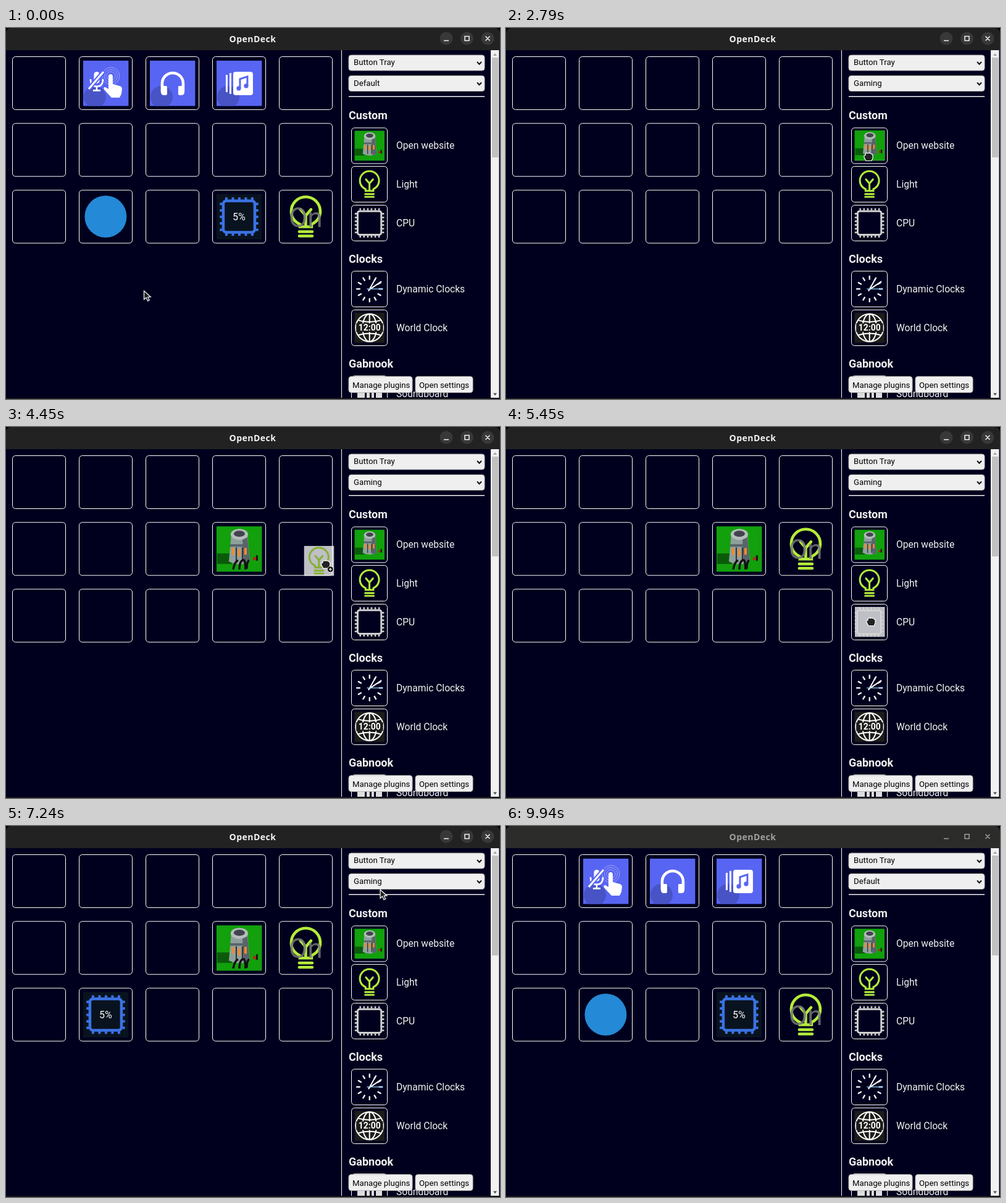
An HTML page for the animation above (10000 ms loop, 800x602 px).

```html
<!DOCTYPE html>
<html lang="en">
<meta charset="utf-8">
<title>OpenDeck</title>
<style>
  html, body { margin: 0; width: 100%; height: 100%; overflow: hidden; background: #000; }
  svg { display: block; width: 100%; height: 100%; font-family: Roboto, sans-serif; }
  .line { fill: none; stroke: #fff; stroke-width: 1; }
  .label { font-size: 15.6px; fill: #f2f2f2; }
  .head { font-size: 18px; font-weight: 600; fill: #f2f2f2; }
  .form { font-size: 13.2px; }
  .title { font: bold 14px "Open Sans", sans-serif; letter-spacing: .5px; text-anchor: middle; }
</style>
<svg viewBox="0 0 800 602">
  <defs>
    <clipPath id="tile"><path d="M0 0H73.5V73.5H0Z"/></clipPath>
    <clipPath id="view"><path d="M544 36H785V600H544Z"/></clipPath>
    <g id="blue" clip-path="url(#tile)">
      <path fill="#5865f2" d="M0 0H74V74H0Z"/>
      <circle cx="19" cy="59" r="18" fill="#4854c6"/>
    </g>
    <g id="mute">
      <use href="#blue"/>
      <g fill="none" stroke="#fff" stroke-width="1" opacity=".4">
        <circle cx="45" cy="25" r="14"/><circle cx="45" cy="25" r="10.5"/><circle cx="45" cy="25" r="7"/>
      </g>
      <rect x="17.5" y="18" width="9" height="19" rx="4.5" fill="#fff"/>
      <path fill="none" stroke="#fff" stroke-width="2.6" d="M12 30q0 12 10 12t10-12M22 42v6M16 48.5h12"/>
      <path stroke="#5865f2" stroke-width="7" d="M34 17 9 46"/>
      <path stroke="#fff" stroke-width="3" d="M33 18 9 46"/>
      <path fill="#fff" d="M41 26q0-4 3.5-4t3.5 4v12l11 3q4 1 4 5l-1 8-3 6h-13L34 47q-2-4 2-4l5 3z"/>
    </g>
    <g id="phones">
      <use href="#blue"/>
      <path fill="none" stroke="#fff" stroke-width="4.5" d="M20 50V37a17 17 0 0 1 34 0V50"/>
      <path fill="#fff" d="M18 41h8q2 0 2 2v11q0 2-2 2h-3q-5 0-5-5zM56 41h-8q-2 0-2 2v11q0 2 2 2h3q5 0 5-5z"/>
    </g>
    <g id="album">
      <use href="#blue"/>
      <path stroke="#fff" stroke-width="3" d="M16.5 23v28M22.5 20v34"/>
      <rect x="27" y="18" width="32" height="38" rx="4" fill="#fff"/>
      <path fill="none" stroke="#5865f2" stroke-width="3" d="M38 45V30l12-4v15"/>
      <g fill="#5865f2"><circle cx="36" cy="45" r="3.6"/><circle cx="48" cy="41" r="3.6"/></g>
    </g>
    <circle id="disc" cx="36.5" cy="36.5" r="34" fill="#2489d6"/>
    <g id="bulb" fill="none" stroke="#b4ec3a" stroke-width="4.6" stroke-linecap="round">
      <path d="M27 53v-4q-14-7-14-21a23.5 23.5 0 0 1 47 0q0 14-14 21v4zM36.5 51V35L28 25M36.5 35 45 25"/>
      <path d="M26 61h21M26 68h21"/>
    </g>
    <g id="on">
      <use href="#bulb"/>
      <text x="36.5" y="53" font-size="44" text-anchor="middle" fill="#777" fill-opacity=".85">On</text>
    </g>
    <g id="chip" fill="none" stroke="#cfcfcf">
      <rect x="7.5" y="7.5" width="58" height="58" rx="5" stroke-width="4.5"/>
      <path stroke-width="5" stroke-dasharray="4 5.2" d="M12 3H62M12 70H62M3 12V62M70 12V62"/>
    </g>
    <g id="load">
      <path fill="#09131f" d="M0 0H73.5V73.5H0Z"/>
      <g fill="none" stroke="#3b72e4">
        <rect x="11" y="11" width="51" height="51" rx="5" stroke-width="4.5"/>
        <path stroke-width="4.5" stroke-dasharray="4 6.5" d="M14 7.5H62M14 65.500H62M7.500 14V62M65.500 14V62"/>
      </g>
      <text x="36.500" y="42.500" font-size="16" text-anchor="middle" fill="#fff">5%</text>
    </g>
    <g id="tower">
      <path fill="#12a00c" d="M0 0H73.500V73.500H0Z"/>
      <path fill="#0a5a0a" d="M1 44H25V61H1Z"/>
      <path fill="#8fa09c" d="M24 12H50L54 57Q38 66 20 57Z"/>
      <path fill="#59636a" d="M42 18H50L54 57L44 61ZM22 29H51V33H22Z"/>
      <ellipse cx="37" cy="13" rx="14" ry="9" fill="#b6bcbc"/>
      <ellipse cx="37" cy="12" rx="9" ry="5" fill="#41434d"/>
      <path stroke="#f08a32" stroke-width="4" d="M27 35V46M37 37V49M47 35V46"/>
      <path stroke="#2b2f3a" stroke-width="2" d="M32 34V57M42 34V57"/>
      <path fill="#b02a18" d="M59 50h6v5h-6z"/><path fill="#151515" d="M64 47h3v9h-3z"/>
    </g>
    <g id="towerKey">
      <use href="#tower"/>
      <path fill="none" stroke="#111" stroke-width="3.500" d="M27 70q2-12 8-15M37 70q0-12 5-15t5 15M49 69q0-12 4-14"/>
    </g>
    <g id="clock" stroke="#fff"></g>
    <g id="globe">
      <path fill="#1c1d19" d="M0 0H73.500V73.500H0Z"/>
      <g fill="none" stroke="#fff" stroke-width="3">
        <circle cx="36.700" cy="36.700" r="34"/><ellipse cx="36.700" cy="36.700" rx="17" ry="34"/>
        <path d="M36.700 3V71M8 18Q36.700 27 65 18M8 55Q36.700 46 65 55"/>
      </g>
      <path fill="#1c1d19" d="M4 26H70V47H4Z"/>
      <text x="36.700" y="44" font-size="21" font-weight="bold" text-anchor="middle" fill="#fff">12:00</text>
    </g>
    <path id="chevron" d="M-3.500-2 0 1.800 3.500-2" fill="none" stroke="#111" stroke-width="2"/>
  </defs>

  <path fill="#00001e" d="M0 36H800V602H0Z"/>
  <path id="bar" d="M0 36V9Q0 0 9 0H791Q800 0 800 9V36Z"/>
  <g id="round" fill="#383838"><circle cx="713" cy="17" r="10.500"/><circle cx="746.500" cy="17" r="10.500"/><circle cx="780" cy="17" r="10.500"/></g>
  <g id="caption">
    <text class="title" x="399.500" y="23">OpenDeck</text>
    <path fill="none" stroke="currentColor" stroke-width="1.500" d="M709 20.500h8M743 13.500h7v7h-7zM776.500 13.500l7 7m0-7-7 7"/>
  </g>
  <path class="line" d="M543.500 36V600"/>
  <g id="keys"></g>
  <g id="home"></g>
  <g id="game"></g>

  <g id="side" clip-path="url(#view)"></g>
  <g fill="#efefef" stroke="#b5b5b5" stroke-width="1">
    <rect x="555" y="44" width="220" height="25" rx="4"/><rect x="555" y="77.500" width="220" height="25" rx="4"/>
    <rect x="555" y="565.500" width="103" height="26" rx="4"/><rect x="663" y="565.500" width="93" height="26" rx="4"/>
  </g>
  <path stroke="#f2f2f2" stroke-width="1.500" d="M555 111.200H775"/>
  <use href="#chevron" x="766.500" y="57"/><use href="#chevron" x="766.500" y="90.500"/>
  <g class="form">
    <text x="563" y="60">Button Tray</text><text id="profile" x="563" y="94"></text>
    <text x="561" y="583.500">Manage plugins</text><text x="669" y="583.500">Open settings</text>
  </g>

  <path fill="#f1f1f1" d="M785 36H798.500V600H785Z"/>
  <path fill="#c1c1c1" d="M787 48H797.500V210H787Z"/>
  <path fill="#a3a3a3" d="M789 45l3-4 3 4z"/><path fill="#505050" d="M789 592.500l3 4 3-4z"/>
  <path fill="#1b1b1b" d="M0 600.500H800V602H0Z"/>

  <g id="popup" class="form">
    <rect x="555.500" y="100.500" width="220.500" height="53" fill="#efefef" stroke="#8a8a8a"/>
    <rect id="mark" x="557" width="218" height="16.300" fill="#1e90ff"/>
  </g>
  <g id="ghost" opacity=".75"><path fill="#fff" d="M0 0H48.500V48.500H0Z"/><use id="cargo" transform="scale(.66)"/></g>
  <g id="pointer">
    <path id="arrow" fill="#222" stroke="#fff" stroke-width="1.200" d="M.5.500V14.500L4 11.500 6.500 17 9.200 15.800 6.800 10.500H11.300Z"/>
    <g id="fist">
      <path fill="#222" stroke="#fff" stroke-width="1.200" d="M-4 6.500-7 1v-3l2-.5.500-3 2-1 1.500 1 2-1 1.500 1h2l1 1.500L7-3V2L5 6.500Z"/>
      <g id="plus"><circle cx="7.500" cy="8" r="4.800" fill="#000" stroke="#fff" stroke-width=".8"/><path stroke="#fff" stroke-width="1.300" d="M5 8h5M7.500 5.500v5"/></g>
    </g>
  </g>
</svg>
<script>
const $ = id => document.getElementById(id);
const show = (id, on) => $(id).style.display = on ? '' : 'none';
const add = (id, markup) => $(id).insertAdjacentHTML('beforeend', markup);
const keyX = c => 10.5 + 108 * c, keyY = r => 46.5 + 108.3 * r;
const place = (group, icon, c, r, id = '') =>
  add(group, `<use id="${id}" href="#${icon}" x="${keyX(c) + 6.4}" y="${keyY(r) + 6.4}"/>`);

// Deck
for (let i = 0; i < 15; i++)
  add('keys', `<rect class="line" x="${keyX(i % 5)}" y="${keyY(i / 5 | 0)}" width="86" height="86" rx="5"/>`);
place('home', 'mute', 1, 0);
place('home', 'phones', 2, 0);
place('home', 'album', 3, 0);
place('home', 'disc', 1, 2);
place('home', 'load', 3, 2);
place('home', 'on', 4, 2);

// Sidebar
for (let i = 0; i < 12; i++)
  add('clock', `<path stroke-width="3.500" d="M36.700 4V14" transform="rotate(${i * 30} 36.700 36.700)"/>`);
add('clock', '<path stroke-width="3" d="M34 42 51 12M34 40 66 18"/><path stroke="#8fc8f0" stroke-width="2" d="M30 36.700H69"/>');
const rows = [['Open website', 162, 'tower'], ['Light', 224.5, 'bulb'], ['CPU', 287.5, 'chip'],
  ['Dynamic Clocks', 394.5, 'clock'], ['World Clock', 457.5, 'globe'], ['Soundboard', 564.5, '']];
for (const [name, y, icon] of rows)
  add('side', `<rect class="line" x="559.500" y="${y}" width="58" height="58" rx="5"/>
    <text class="label" x="632" y="${y + 34}">${name}</text>
    <use href="#${icon}" transform="translate(564.500 ${y + 4.7}) scale(.66)"/>`);
add('side', '<path fill="#ddd" d="M569 588h12v12h-12zM584 588h5v12h-5zM592 588h4v12h-4zM599 588h10v12h-10z"/>');
for (const [name, y] of [['Custom', 148], ['Clocks', 381], ['Gabnook', 551]])
  add('side', `<text class="head" x="555" y="${y}">${name}</text>`);

const options = ['Default', 'Gaming', 'Manage profiles...'];
options.forEach((name, i) => add('popup', `<text class="option" x="564" y="${114.3 + 16.4 * i}">${name}</text>`));

// Pointer route: time, x, y
const route = [[0, 223, 426], [30, 223, 426], [420, 760, 80], [970, 760, 80], [1360, 640, 141], [1520, 640, 141],
  [1640, 617, 122], [2180, 617, 122], [2520, 587, 209], [2790, 587, 209], [3330, 420, 208], [3470, 390, 207],
  [3600, 390, 207], [3800, 409, 217], [4110, 600, 259], [4200, 600, 259], [4450, 518, 223], [4540, 505, 217],
  [4620, 505, 217], [4830, 529, 275], [5300, 591, 316], [5450, 591, 316], [5940, 200, 307], [6020, 182, 309],
  [6110, 182, 309], [6450, 151, 351], [6580, 151, 351], [7240, 605, 103], [7490, 622, 82], [7730, 622, 82],
  [7880, 626, 130], [8000, 626, 112], [8340, 626, 112], [8700, 548, 292], [9270, 548, 292], [9420, 756, 4], [10000, 756, 4]];

// Tangents vanish wherever the pointer rests
function slope(i, k) {
  const a = route[i - 1], b = route[i], c = route[i + 1];
  const rests = (p, q) => !p || !q || (p[1] === q[1] && p[2] === q[2]);
  return rests(a, b) || rests(b, c) ? 0 : (c[k] - a[k]) / (c[0] - a[0]);
}
function pointerAt(t) {
  const i = route.findIndex(p => p[0] > t) - 1, a = route[i], b = route[i + 1];
  const d = b[0] - a[0], u = (t - a[0]) / d, s = u * u * (3 - 2 * u);
  return [1, 2].map(k => a[k] + (b[k] - a[k]) * s
    + d * u * (1 - u) * ((1 - u) * slope(i, k) - u * slope(i + 1, k)));
}

const drags = [
  { from: 2790, to: 3540, icon: 'tower', dx: 22, dy: 43, key: ['towerKey', 3, 1] },
  { from: 4200, to: 4590, icon: 'bulb', dx: 35, dy: 30, key: ['on', 4, 1] },
  { from: 5450, to: 6060, icon: 'chip', dx: 26, dy: 24, key: ['load', 1, 2] }];
drags.forEach((d, i) => place('game', ...d.key, 'drop' + i));

const within = (v, a, b) => v >= a && v < b;
const overKey = (x, y) => within((x - 10) % 108, 0, 87) && within((y - 46) % 108.3, 0, 87) && x < 530 && y < 350;

function draw(t) {
  const [x, y] = pointerAt(t), gaming = within(t, 1880, 8210), idle = t >= 9940;
  const open = within(t, 760, 1880) || within(t, 7550, 8210);
  const drag = drags.find(d => within(t, d.from, d.to));

  $('bar').setAttribute('fill', idle ? '#2c2c2b' : '#222');
  $('caption').setAttribute('fill', idle ? '#a0a0a0' : '#f4f4f4');
  $('caption').style.color = idle ? '#a0a0a0' : '#f4f4f4';
  show('round', !idle);
  show('home', !gaming);
  show('game', gaming);
  drags.forEach((d, i) => show('drop' + i, t >= d.to));
  $('profile').textContent = options[+gaming];

  show('popup', open);
  const pick = y < 102 ? +gaming : Math.min(2, Math.floor((y - 102) / 16.4));
  $('mark').setAttribute('y', 102.3 + 16.4 * pick);
  document.querySelectorAll('.option').forEach((o, i) => o.setAttribute('fill', i === pick ? '#fff' : '#000'));

  show('ghost', drag);
  if (drag) {
    $('cargo').setAttribute('href', '#' + drag.icon);
    $('ghost').setAttribute('transform', `translate(${x - drag.dx} ${y - drag.dy})`);
  }
  show('pointer', t < 9420);
  show('arrow', !drag);
  show('fist', drag);
  show('plus', overKey(x + 2, y));
  $('pointer').setAttribute('transform', `translate(${x} ${y})`);
}
function tick() {
  draw(performance.now() % 10000);
  requestAnimationFrame(tick);
}
tick();
</script>
</html>
```
